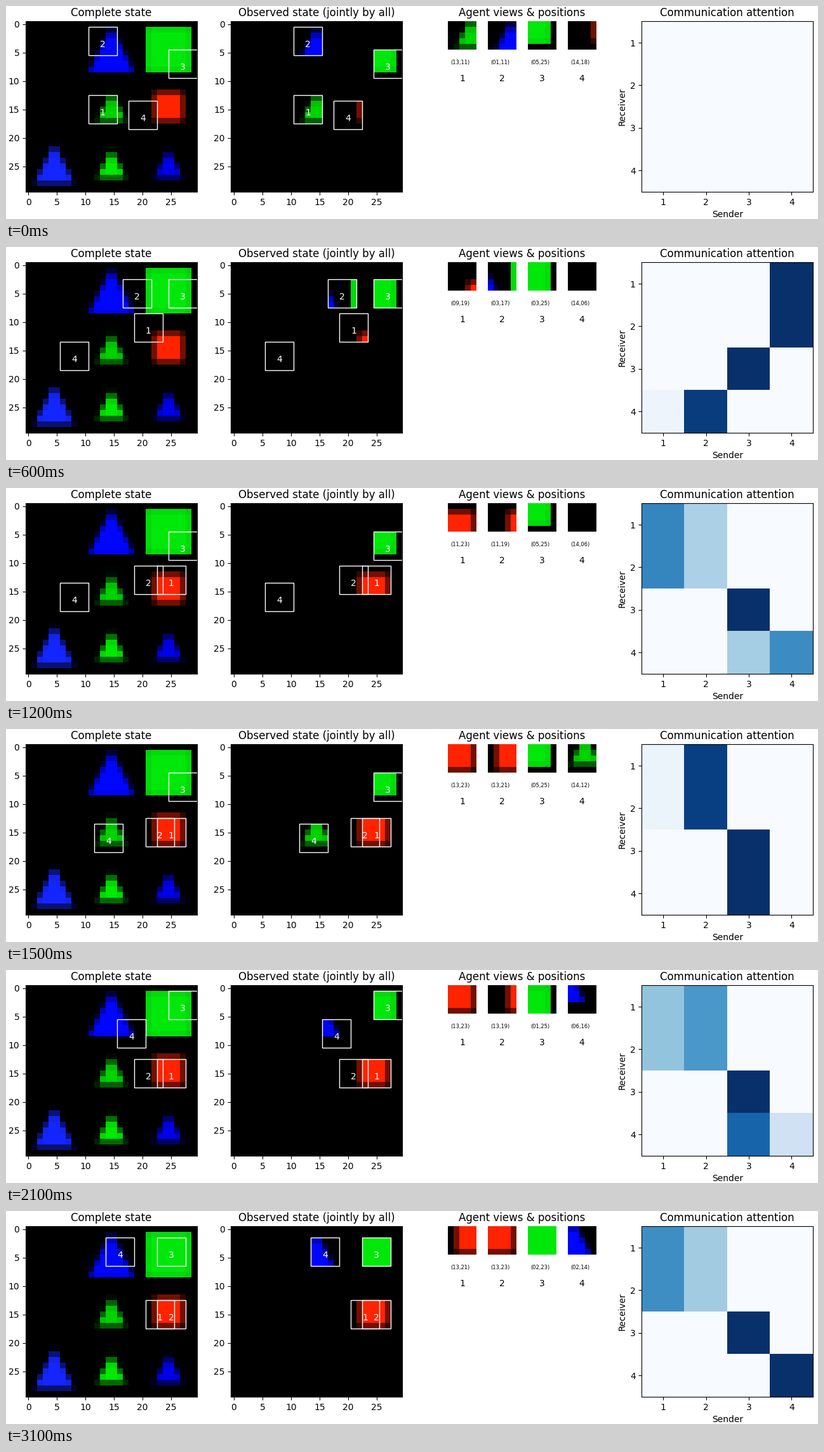
Recreate the animation shown at these times as a matplotlib script. Size 1279 by 337 pixels, loop 3.2 s.

```python
import numpy as np
import matplotlib.pyplot as plt
from matplotlib.animation import FuncAnimation
from matplotlib.patches import Rectangle

W, H, DPI = 1279, 337, 100
FRAMES, N, VIEW, SLOT = 32, 30, 5, 10

# Four square panels in a row, with gaps of a fifth of their width
SIDE = 0.775 * 1600 / 4.6
PITCH = 1.2 * SIDE
LEFT, TOP = 31, 24.4

# Waypoints as (row, col), one route per agent
STEPS = [0, 6, 10, 15, 21, 26, 31]
ROUTES = np.array([
    [(13, 11), (9, 19), (11, 23), (13, 23), (13, 23), (11, 23), (13, 21)],
    [(1, 11), (3, 17), (9, 19), (13, 21), (13, 19), (13, 25), (13, 23)],
    [(5, 25), (3, 25), (5, 25), (5, 25), (1, 25), (0, 25), (2, 23)],
    [(14, 18), (14, 6), (14, 2), (14, 12), (6, 16), (4, 12), (2, 14)],
])

# Favourite sender of each receiver, and the doubt of agents 1-2 and of agent 4
FAVOURITES = ["4432", "1134", "2233", "2233", "2234", "1134"]
DOUBTS = [(0, .05), (0, 0), (.06, 0), (.4, .2), (.19, .04), (.36, 0)]


def attention(favourites, doubts):
    """Each receiver splits its weight between a sender and that sender's partner."""
    team, scout = doubts
    m = np.zeros((4, 4))
    for row, sender, doubt in zip(m, favourites, (team, team, 0, scout)):
        s = int(sender) - 1
        row[s], row[s ^ 1] = 1 - doubt, doubt
    return m


ATTENTION = [np.zeros((4, 4))] + [attention(*k) for k in zip(FAVOURITES, DOUBTS)]


def build_world(fine=20):
    """Shapes centred in a 3 by 3 grid, averaged down to soft-edged cells."""
    y, x = (np.mgrid[:N * fine, :N * fine] + .5) / fine
    world = np.zeros((N, N, 3))

    def add(kind, row, col, size, color):
        half = size / 2 - .05
        dx = np.abs(x - (col + .5) * SLOT)
        dy = y - (row + .5) * SLOT
        limit = half if kind == "square" else (dy + half) / 2
        mask = (dx < limit) & (np.abs(dy) < half)
        cover = mask.reshape(N, fine, N, fine).mean(axis=(1, 3))
        world[...] += cover[..., None] * np.array(color)

    add("triangle", 0, 1, 8, (0, .02, 1))
    add("square", 0, 2, 8, (0, .91, .04))
    add("triangle", 1, 1, 5, (0, .83, 0))
    add("square", 1, 2, 5, (1, .14, 0))
    add("triangle", 2, 0, 7, (.08, .15, 1))
    add("triangle", 2, 1, 5, (0, .92, 0))
    add("triangle", 2, 2, 5, (0, 0, .92))
    return world.clip(0, 1)


def segment(n):
    """Waypoint before step n and the progress towards the next one."""
    i = min(np.searchsorted(STEPS, n, side="right"), len(STEPS) - 1) - 1
    return i, (n - STEPS[i]) / (STEPS[i + 1] - STEPS[i])


def positions(n):
    """Agents hop by two cells along their routes."""
    i, t = segment(n)
    a, b = ROUTES[:, i], ROUTES[:, i + 1]
    if t == 1:
        return b
    return np.clip(a + 2 * np.round((b - a) * t / 2).astype(int), 0, N - VIEW)


def weights(n):
    i, t = segment(n)
    if i == 0:
        return ATTENTION[int(n > 0)]
    t = t * t * (3 - 2 * t)
    return ATTENTION[i] * (1 - t) + ATTENTION[i + 1] * t


plt.rcParams["font.family"] = "DejaVu Sans"
fig = plt.figure(figsize=(W / DPI, H / DPI), dpi=DPI, facecolor="white")


def panel(k, title, data, **style):
    ax = fig.add_axes([(LEFT + k * PITCH) / W, 1 - (TOP + SIDE) / H,
                       SIDE / W, SIDE / H])
    ax.set_title(title, fontsize=12)
    return ax, ax.imshow(data, interpolation="nearest", **style)


WORLD = build_world()
BLACK, WHITE = np.zeros_like(WORLD), np.ones_like(WORLD)
full, _ = panel(0, "Complete state", WORLD)
seen, seen_img = panel(1, "Observed state (jointly by all)", BLACK)
views, views_img = panel(2, "Agent views & positions", WHITE)
comm, comm_img = panel(3, "Communication attention", np.zeros((4, 4)),
                       cmap="Blues", vmin=0, vmax=1)

for ax in (full, seen):
    ax.set_xticks(range(0, N, 5))
    ax.set_yticks(range(0, N, 5))
views.axis("off")
comm.set_xticks(range(4), range(1, 5))
comm.set_yticks(range(4), range(1, 5))
comm.set_xlabel("Sender")
comm.set_ylabel("Receiver")

markers, coords = [], []
for i in range(4):
    for ax in (full, seen):
        box = ax.add_patch(Rectangle((0, 0), VIEW, VIEW, fill=False,
                                     ec="white", lw=1))
        tag = ax.text(0, 0, str(i + 1), color="white", fontsize=10, ha="center")
        markers.append((i, box, tag))
    x = 2 + (VIEW + 2) * i
    coords.append(views.text(x, 7, "", fontsize=6))
    views.text(x + 2, 10, str(i + 1), fontsize=10, ha="center")


def update(n):
    pos = positions(n)
    observed, sheet = BLACK.copy(), WHITE.copy()
    for i, (r, c) in enumerate(pos):
        patch = WORLD[r:r + VIEW, c:c + VIEW]
        observed[r:r + VIEW, c:c + VIEW] = patch
        x = 2 + (VIEW + 2) * i
        sheet[:VIEW, x:x + VIEW] = patch
        coords[i].set_text(f"({r:02d},{c:02d})")
    for i, box, tag in markers:
        r, c = pos[i]
        box.set_xy((c - .5, r - .5))
        tag.set_position((c + 2, r + 3))
    seen_img.set_data(observed)
    views_img.set_data(sheet)
    comm_img.set_data(weights(n))
    return []


anim = FuncAnimation(fig, update, frames=FRAMES, interval=100, repeat=True,
                     repeat_delay=0, blit=False)
plt.show()
```
